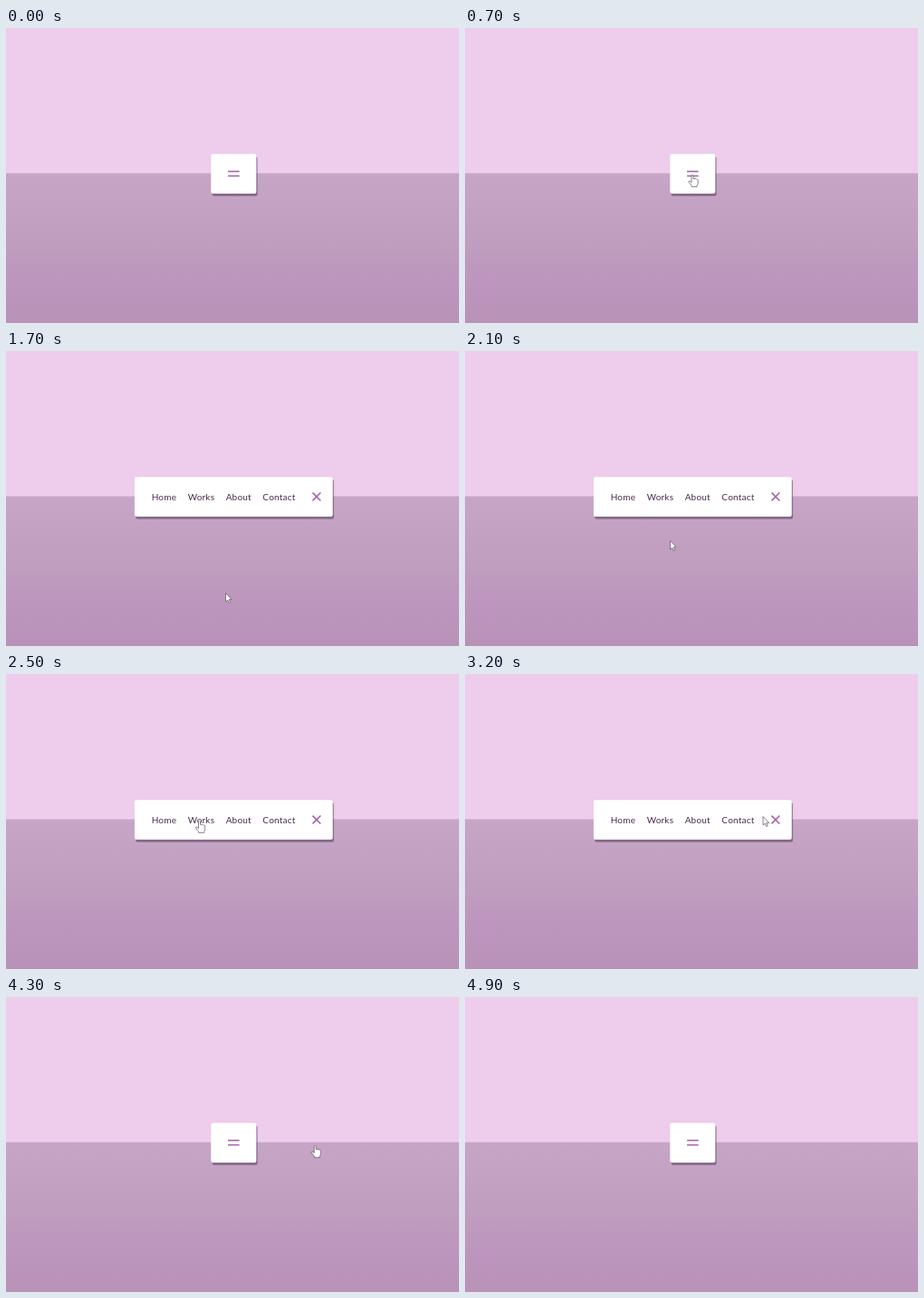
An HTML page that plays this animation: 500x326 px, repeating every 5.2 s.

```html
<!DOCTYPE html>
<html lang="en">
<head>
<meta charset="utf-8">
<title>Animated navigation</title>
<style>
html, body { margin: 0; width: 100%; height: 100%; overflow: hidden; background: #edccec; }
svg { display: block; width: 100%; height: 100%; }
text { font: 10px "Lato", "Open Sans", sans-serif; letter-spacing: .2px; fill: #47284c; text-anchor: middle; }
</style>
</head>
<body>
<svg viewBox="0 0 500 326">
  <defs>
    <linearGradient id="floor" x1="0" y1="0" x2="0" y2="1">
      <stop offset="0" stop-color="#c6a5c6"/>
      <stop offset=".5" stop-color="#bf9dbe"/>
      <stop offset=".65" stop-color="#bd97be"/>
      <stop offset="1" stop-color="#b892b7"/>
    </linearGradient>
    <filter id="soft" x="-10%" y="-20%" width="120%" height="140%">
      <feGaussianBlur stdDeviation=".4"/>
    </filter>
  </defs>
  <rect width="500" height="326" fill="#edccec"/>
  <rect y="160.5" width="500" height="165.5" fill="url(#floor)"/>
  <rect id="shade" y="141.9" height="43.75" rx="2" fill="#3c283c" opacity=".45" filter="url(#soft)"/>
  <rect id="bar" y="139.2" height="43.75" rx="2" fill="#fff"/>
  <g id="links"></g>
  <g id="icon">
    <rect id="plate" x="-9.4" y="-9.4" height="18.75" fill="#fff"/>
    <rect class="line" x="-6.25" y="-.8" width="12.5" height="1.6" fill="#a563a8"/>
    <rect class="line" x="-6.25" y="-.8" width="12.5" height="1.6" fill="#a563a8"/>
  </g>
  <g id="cursor" fill="#fff" stroke="#655a68" stroke-width=".75" stroke-linejoin="round">
    <path id="arrow" d="M0 .5V10L2.2 8.2 3.7 11.5 5.2 10.8 3.7 7.6H6.6Z"/>
    <path id="hand" d="M-1 1Q0-.4 1 1V4.6Q2.4 3.4 2.9 4.9Q4 3.7 4.7 5.2Q6 4.8 6.2 6.4V9.4Q6 11.4 5 12.2V13.4H-.9V12.2L-4 8.3Q-4.4 6.6-2.7 7.2L-1 8.7Z"/>
  </g>
</svg>
<script>
const LOOP = 5200, STEP = 100, SCALE = 0.625, CX = 251.3, CY = 161, GAP = 12.5;
const $ = id => document.getElementById(id);
const clamp = v => Math.max(0, Math.min(1, v));
const mix = (a, b, f) => a + (b - a) * f;
const smooth = f => f * f * (3 - 2 * f);
const set = (el, attrs) => { for (const k in attrs) el.setAttribute(k, attrs[k]); };

const lines = document.querySelectorAll(".line");
const links = ["Home", "Works", "About", "Contact"].map(word => {
  const el = document.createElementNS("http://www.w3.org/2000/svg", "text");
  el.textContent = word;
  $("links").append(el);
  return el;
});

// places the pointer visits: time, x, y
const stops = [
  [200, 266, 318], [700, 251, 162], [880, 251, 162],
  [1200, 259, 291], [1700, 242.5, 267],
  [2450, 213.5, 162], [2600, 213.5, 162],
  [3200, 329, 157], [3400, 341, 161], [4250, 341, 161],
  [4900, 352, 330]
];

// linear opening and closing, 600 ms each
const openness = (t, start, end) => clamp((t - start) / 600) - clamp((t - end) / 600);

// a centred flex row: list of width p * 100%, then a shrinkable button
function layout(p) {
  const width = 80 + 270 * p, inner = width - 40;
  const want = p * inner + 30;
  const fit = Math.min(1, inner / want);
  const left = CX - width * SCALE / 2;
  const start = left + (20 + (inner - want * fit) / 2) * SCALE;
  return { left, width: width * SCALE, start, button: start + p * inner * fit * SCALE, plate: 30 * fit * SCALE };
}

function drawNav(t) {
  const box = layout(openness(t, 894, 3606));
  const spin = openness(t, 880, 3606);
  set($("bar"), { x: box.left, width: box.width });
  set($("shade"), { x: box.left + 1.3, width: box.width });

  const flip = Math.cos(2 * Math.PI * spin);
  let x = box.start + GAP / 2;
  for (const el of links) {
    const w = el.getComputedTextLength();
    set(el, { transform: `translate(${x + w / 2} ${CY + 3.8}) scale(${flip} 1)`, opacity: spin });
    x += w + GAP;
  }

  set($("icon"), { transform: `translate(${box.button + 15 * SCALE} ${CY})` });
  set($("plate"), { width: box.plate });
  lines.forEach((el, i) => {
    const side = i ? 1 : -1;
    set(el, {
      transform: `translate(0 ${side * 2.5}) rotate(${side * 765 * spin}) translate(0 ${-side * 3.44 * spin})`
    });
  });
}

// a hand along the row of links, except in the space before the button
const gapX = layout(1).button - 4;
const isHand = (x, y) => Math.abs(y - CY) < 5 && Math.abs(x - gapX) > 6;

function drawCursor(t) {
  const i = stops.findIndex(s => t < s[0]);
  set($("cursor"), { visibility: i > 0 ? "visible" : "hidden" });
  if (i < 1) return;
  const [t0, x0, y0] = stops[i - 1], [t1, x1, y1] = stops[i];
  const f = smooth((t - t0) / (t1 - t0));
  const x = mix(x0, x1, f), y = mix(y0, y1, f), hand = isHand(x, y);
  set($("cursor"), { transform: `translate(${x} ${y})` });
  set($("hand"), { display: hand ? "inline" : "none" });
  set($("arrow"), { display: hand ? "none" : "inline" });
}

function draw(now) {
  const t = Math.floor((now % LOOP) / STEP) * STEP;
  drawNav(t);
  drawCursor(t);
}

const begin = performance.now();
function tick() {
  draw(performance.now() - begin);
  requestAnimationFrame(tick);
}
tick();
</script>
</body>
</html>
```
